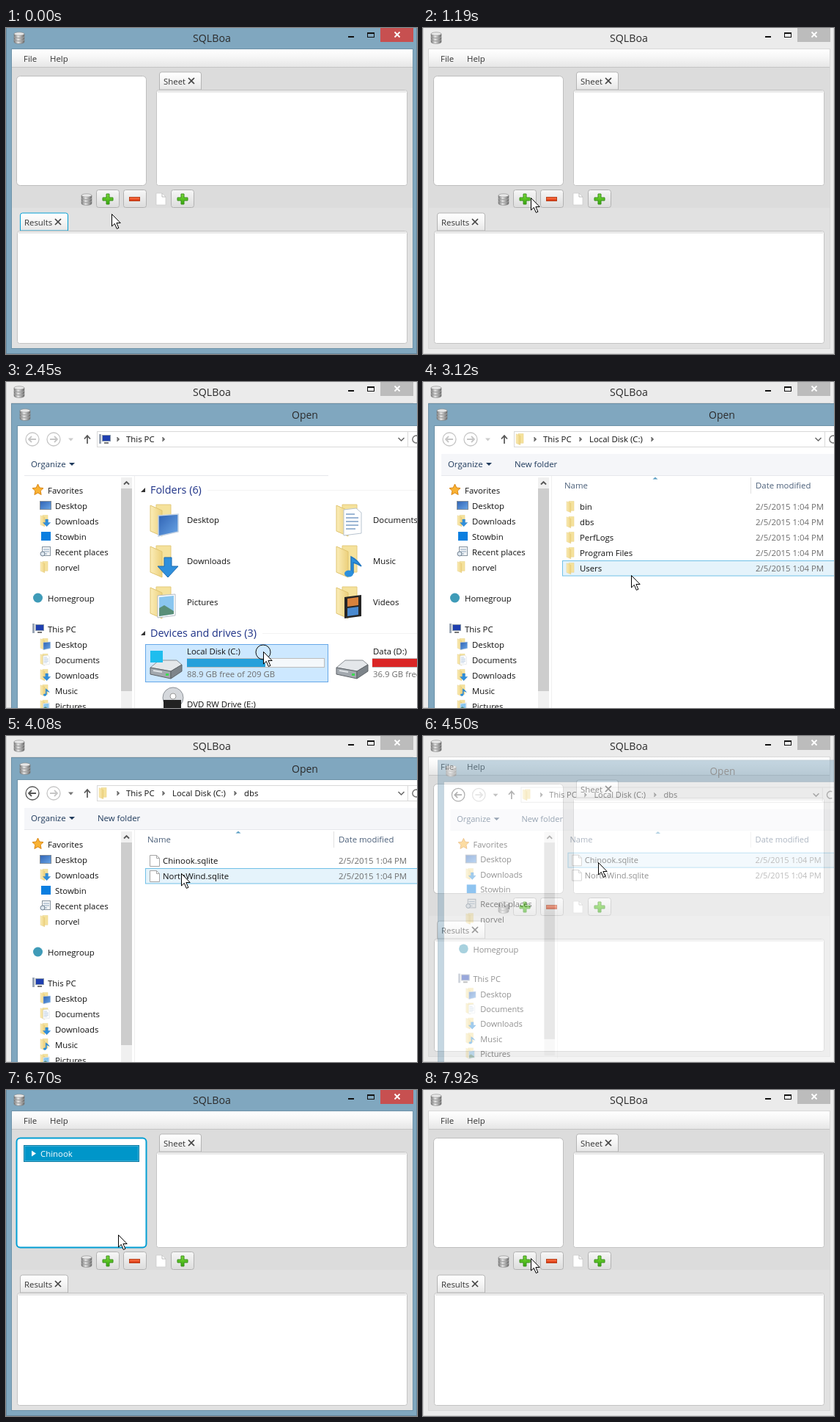
These frames come from a looping animation (561x444 px, 8 s). An HTML page:

```html
<!DOCTYPE html>
<html lang="en">
<head>
<meta charset="utf-8">
<title>SQLBoa</title>
<style>
html, body { margin: 0; width: 100%; height: 100%; overflow: hidden; background: #ebebeb; }
svg { display: block; width: 561px; height: 444px; font-family: "Open Sans", "Noto Sans", sans-serif; }
</style>
</head>
<body>
<svg viewBox="0 0 561 444">
  <defs>
    <linearGradient id="menu" x2="0" y2="1"><stop stop-color="#fff"/><stop offset=".45" stop-color="#f6f6f6"/><stop offset="1" stop-color="#e6e6e6"/></linearGradient>
    <linearGradient id="btn" x2="0" y2="1"><stop stop-color="#f7f7f7"/><stop offset="1" stop-color="#dcdcdc"/></linearGradient>
    <linearGradient id="metal"><stop stop-color="#777"/><stop offset=".4" stop-color="#eee"/><stop offset="1" stop-color="#666"/></linearGradient>
    <linearGradient id="green" x2="0" y2="1"><stop stop-color="#7ddb3c"/><stop offset="1" stop-color="#35a80c"/></linearGradient>
    <linearGradient id="red" x2="0" y2="1"><stop stop-color="#ff7a4a"/><stop offset="1" stop-color="#d6300c"/></linearGradient>
    <linearGradient id="flap"><stop stop-color="#fbedb8"/><stop offset="1" stop-color="#ecd07c"/></linearGradient>
    <linearGradient id="screen" x2="1" y2="1"><stop stop-color="#2f62b4"/><stop offset="1" stop-color="#6aa6e6"/></linearGradient>
  </defs>
  <g id="scene"></g>
</svg>
<script>
const scene = document.getElementById('scene');
const BLUE = '#80a7bf', FOCUS = '#039ed3', INK = '#111', GREY = '#6d6d6d';

// Drawing helpers, each returning markup
const text = (x, y, s, fill = INK, size = 11.4) =>
  `<text x="${x}" y="${y}" fill="${fill}" font-size="${size}">${s}</text>`;
const rect = (x, y, w, h, fill, stroke = 'none', rx = 0, sw = 1) =>
  `<rect x="${x}" y="${y}" width="${w}" height="${h}" fill="${fill}" stroke="${stroke}" rx="${rx}" stroke-width="${sw}"/>`;
const path = (d, fill = 'none', stroke = 'none', w = 1) =>
  `<path d="${d}" fill="${fill}" stroke="${stroke}" stroke-width="${w}"/>`;
const circle = (x, y, r, fill = 'none', stroke = 'none', w = 1) =>
  `<circle cx="${x}" cy="${y}" r="${r}" fill="${fill}" stroke="${stroke}" stroke-width="${w}"/>`;
const at = (x, y, body, k = 1) => `<g transform="translate(${x} ${y}) scale(${k})">${body}</g>`;
const cross = (x, y, r, color, w) =>
  path(`M${x - r} ${y - r}l${2 * r} ${2 * r}m0 ${-2 * r}l${-2 * r} ${2 * r}`, 'none', color, w);

// Icons
const database = (x, y) => at(x, y, [10, 6, 2].map(v =>
  path(`M0 ${v}v3a7 2.3 0 0 0 14 0v-3z`, 'url(#metal)', '#777', .6) +
  `<ellipse cx="7" cy="${v}" rx="7" ry="2.2" fill="#e8e8e8" stroke="#888" stroke-width=".6"/>`).join(''));
const page = (x, y) => path(`M${x} ${y}h9l4 4v11h-13z`, '#fff', '#a5a5a5') +
  path(`M${x + 9} ${y}v4h4`, 'none', '#a5a5a5');
const plus = (x, y) => path(`M${x - 2} ${y - 7}h4v5h5v4h-5v5h-4v-5h-5v-4h5z`, 'url(#green)', '#3b8f1c');
const monitor = (x, y) => rect(x + 4.5, y + 1.5, 11, 8, '#1f3fb0', '#8b98a8') +
  path(`M${x + 7} ${y + 12}h6`, 'none', '#777', 2) + rect(x, y, 3, 13, '#9aa5b5');
const overlays = {
  Desktop: path('M11 16l27-2v24l-27 6z', 'url(#screen)', '#c4d2e2', 1.5),
  Downloads: path('M19 17h10v12h9L24 44 10 29h9z', '#2f8fdc', '#1c6bb0'),
  Documents: path('M10 8l17-2 7 6v28l-24 3z', '#fff', '#b8c4d0') +
    path('M13 14h12m-12 5h17m-17 5h17m-17 5h17m-17 5h13', 'none', '#7c9fc6', 1.3),
  Music: path('M20 39V16q8 4 14 13-6-4-11-5v15', '#2b8fdd', '#2377c0', 1.5) +
    `<ellipse cx="17" cy="39" rx="6" ry="4.500" fill="#2b8fdd"/>`,
  Pictures: path('M10 13l24-2v29l-24 3z', '#fff', '#b4bcc5') + path('M12 15l20-2v25l-20 3z', '#8ac6ef') +
    path('M12 41V30l7-4 13 8v4z', '#5a8f78'),
  Videos: path('M11 15l23-3v29l-23 3z', '#262626') + path('M15 17l15-2v11l-15 2z', '#d9823c') +
    path('M15 30l15-2v11l-15 2z', '#4a8ad0'),
};
const folder = (x, y, kind, k = 1) => at(x, y,
  path('M8 1h20v36H8z', '#f5e29c', '#e3ca7c') + path('M0 2l16 7v35L0 37z', 'url(#flap)', '#e0c470') + (overlays[kind] || ''), k);
const drive = (x, y) => at(x, y,
  path('M2 27L14 17h24l7 6-15 9z', '#e4e7ea', '#8a8f94') + path('M2 27l28 5v10L2 36z', '#a2a8ae', '#5c6166') +
  path('M30 32l15-9v9L30 42z', '#7d848a', '#5d6267') + rect(23, 35, 4, 3, '#3ddb52') + path('M6 31l12 2', 'none', '#dfe3e6', 2));
const screenIcon = y => rect(46.500, y - 5.500, 15, 11, 'url(#screen)', '#7d8a99');
const smallFolder = (x, y, kind) => folder(x + 1, y - 8, kind, .36);

// Main window
function tab(x, y, w, label, focused) {
  return path(`M${x + .5} ${y + 24}v-21q0-3 3-3h${w - 6}q3 0 3 3v21z`, 'url(#menu)', focused ? FOCUS : '#b4b4b4') +
    text(x + 6, y + 17, label, '#333') + cross(x + w - 13, y + 12, 4, '#444', 1.7);
}
const pane = (x, y, w, h) => rect(x + .5, y + .5, w, h, '#fff', '#c4c4c4', 3) + rect(x + 2, y + 1, w - 3, 3, '#e9e9e9');
const button = (x, focused) =>
  rect(x + .5, 220.500, 31, 24, 'url(#btn)', focused ? FOCUS : '#b2b2b2', 3, focused ? 2 : 1);

function mainWindow({ active, focus, tree }) {
  const on = name => active && focus === name;
  const picked = tree === 2, ink = picked ? '#fff' : '#333';
  return rect(.5, -.5, 560, 444, active ? BLUE : '#ebebeb', active ? '#67899e' : '#d2d2d2') +
    database(11, 6) + text(255, 19, 'SQLBoa', '#2b2b2b', 14.200) +
    rect(467, 11, 8, 2, '#111') + rect(493.500, 6.500, 9, 6, 'none', '#111') + rect(493, 6, 10, 2, '#111') +
    rect(511, 0, 45, 19, active ? '#c75050' : '#bcbcbc') + cross(534, 9, 3.500, '#fff', 1.800) +
    rect(7.500, 28.500, 548, 408, '#dcdcdc', active ? '#6f93a9' : '#d8d8d8') +
    rect(8, 245, 547, 191, '#e1e1e1') + rect(8, 29, 547, 24, 'url(#menu)') + rect(8, 53, 547, 1, '#c4c4c4') +
    text(24, 46, 'File', '#333') + text(60, 46, 'Help', '#333') +
    rect(14.500, 65.500, 177, 149, '#fff', on('tree') ? FOCUS : '#bdbdbd', 5, on('tree') ? 2 : 1) +
    (picked ? rect(24.500, 75.500, 157, 22, '#0096c9', '#0b7ba3') + rect(25.500, 76.500, 155, 20, 'none', '#3fb0d8') : '') +
    (tree ? path('M35 82.500v8l6-4z', ink) + text(47, 91, 'Chinook', ink) : '') +
    tab(209, 60, 57, 'Sheet') + pane(205, 84, 342, 130) +
    database(103, 226) + button(123, on('add')) + plus(139, 233) +
    button(160, on('remove')) + rect(168.500, 230.500, 14, 5, 'url(#red)', '#b8401c') +
    path('M205 225h8l5 5v11h-13z', '#fff', '#c9c9c9', .7) + path('M213 225v5h5', 'none', '#bbb') + button(225) + plus(241, 233) +
    tab(19, 252, 65, 'Results', on('results')) + pane(15, 276, 532, 153);
}

// File dialog
const side = [
  [147, 'Favorites'], [168, 'Desktop'], [189, 'Downloads'], [210, 'Stowbin'], [231, 'Recent places'], [252, 'norvel'],
  [294, 'Homegroup'], [336, 'This PC'], [357, 'Desktop'], [378, 'Documents'], [399, 'Downloads'], [420, 'Music'], [441, 'Pictures'],
];
const sideIcons = {
  Favorites: y => path(`M43.500 ${y - 8}l2.300 5 5.200.6-3.900 3.700 1 5.200-4.600-2.600-4.600 2.600 1-5.200-3.900-3.700 5.200-.6z`, '#f9b233', '#d98512'),
  Homegroup: y => circle(43.500, y, 6.500, '#3f9bb8'),
  'This PC': y => monitor(36, y - 7),
  Stowbin: y => rect(48, y - 6, 13, 12, '#0a7ee0'),
  'Recent places': y => rect(49.500, y - 6.500, 11, 12, '#f2f4f6', '#8794a0') +
    path(`M51 ${y - 3}h8m-8 3h8m-8 3h5`, 'none', '#8ba4bc') + circle(50, y + 3, 3, '#dfe8f0', '#6f8090'),
};
const closed = (x, y) => path(`M${x + .5} ${y - 3.500}v7l4-3.500z`, '#fff', '#999');
const opened = (x, y) => path(`M${x + 6} ${y - 3}v6h-6z`, '#333');

function sidebar(hover) {
  let out = hover ? rect(18.500, 326.500, 138, 20, '#fff', '#e2e2e2') + rect(18.500, 221.500, 138, 20, '#e5f3fb', '#70c0e7') : '';
  for (const [y, name] of side) {
    const root = ['Favorites', 'Homegroup', 'This PC'].includes(name);
    const inPC = y > 336;
    const icon = sideIcons[name] ? sideIcons[name](y)
      : name === 'Desktop' && !inPC ? screenIcon(y) : smallFolder(46, y, name);
    out += icon + text(root ? 57 : 67, y + 5, name);
    if (hover && root) out += name === 'Homegroup' ? closed(28, y) : opened(25, y);
    if (hover && inPC) out += closed(39, y);
  }
  return out + rect(157, 130, 15, 314, '#f0f0f0') + rect(157, 145, 15, 276, '#cdcdcd') +
    path('M161 139.500l3.500-3.500 3.500 3.500', 'none', '#555', 1.800);
}

const heading = (y, label, end) => opened(184, y) + text(197, y + 5, label, '#1e3287', 14.400) + rect(end, y, 561 - end, 1, '#f3f3f3');

function computerView(c) {
  const hot = c.x > 190 && c.x < 440 && c.y > 357 && c.y < 409;
  let out = heading(147, 'Folders (6)', 275) + heading(342, 'Devices and drives (3)', 350);
  ['Desktop', 'Documents', 'Downloads', 'Music', 'Pictures', 'Videos'].forEach((name, i) => {
    const x = i % 2 * 254, y = 188 + (i >> 1) * 56;
    out += folder(197 + x, y - 22, name) + text(247 + x, y + 4, name);
  });
  return out + (hot ? rect(190.500, 357.500, 249, 51, '#cde8ff', '#66a7e8') : '') +
    drive(195, 362) + rect(197, 366, 17, 16, '#1fbdee') +
    text(247, 371, 'Local Disk (C:)') + rect(247.500, 376.500, 187, 12, hot ? '#f4f8fb' : '#e6e6e6', '#bcbcbc') +
    rect(247, 377, 107, 11, '#26a0da') + text(247, 402, '88.9 GB free of 209 GB', GREY) +
    drive(449, 362) + text(501, 371, 'Data (D:)') + rect(500.500, 376.500, 188, 12, '#e6e6e6', '#bcbcbc') +
    rect(500, 377, 172, 11, '#da2626') + text(501, 402, '36.9 GB free of 465 GB', GREY) +
    circle(228, 430, 14, '#d5d8dc', '#8d9298') + circle(228, 428, 4, '#fff', '#999') + rect(215, 433, 24, 13, '#222') +
    text(247, 443, 'DVD RW Drive (E:)');
}

function listView(names, c, isFolder) {
  const hot = Math.floor((c.y - 159.500) / 21);
  return text(193, 145, 'Name', '#4c607a') + text(454, 145, 'Date modified', '#4c607a') +
    rect(447, 130, 1, 22, '#e0e0e0') + path('M313.500 132.500l3.500-3 3.500 3z', '#5d9fc4') +
    names.map((name, i) => {
      const y = 170 + 21 * i;
      return (i === hot ? rect(190.500, y - 10.500, 380, 20.500, '#e5f3fb', '#70c0e7') : '') +
        (isFolder ? smallFolder(195, y) : page(196.500, y - 7.500)) +
        text(214, y + 4, name) + text(454, y + 4, '2/5/2015 1:04 PM', GREY);
    }).join('');
}

// dir is -1 for back, 1 for forward
const arrowButton = (x, dir, color) => circle(x, 78, 9, '#fff', color, 1.300) +
  path(`M${x - 5 * dir} 78h${10 * dir}m${-4 * dir} -4l${4 * dir} 4 ${-4 * dir} 4`, 'none', color, 1.800);

function dialog(view, c) {
  const crumbs = ['This PC', 'Local Disk (C:)', 'dbs'].slice(0, view + 1);
  const body = view === 0 ? computerView(c)
    : view === 1 ? listView(['bin', 'dbs', 'PerfLogs', 'Program Files', 'Users'], c, true)
    : listView(['Chinook.sqlite', 'NorthWind.sqlite'], c);
  return rect(7.500, 29.500, 620, 460, BLUE, '#6c8fa5') + database(19, 37) + text(390, 50, 'Open', '#2b2b2b', 14) +
    rect(15.500, 59.500, 620, 440, '#fff', '#6f93a9') +
    arrowButton(36, -1, view > 1 ? '#555' : '#c6c6c6') + arrowButton(65, 1, '#c6c6c6') +
    path('M85 76.500h7l-3.500 4z', view > 1 ? '#777' : '#ccc') +
    path('M111 84v-11m-4 4.500l4-4.500 4 4.500', 'none', '#555', 1.700) +
    rect(124.500, 67.500, 500, 21, '#fff', '#d9d9d9') + rect(548, 68, 1, 21, '#d9d9d9') +
    path('M535.500 76l4 4 4-4', 'none', '#666', 1.500) + path('M562 73.500a5 5 0 1 0 0 9', 'none', '#777', 1.500) +
    (view ? smallFolder(126, 78) : monitor(127, 71)) +
    [153, 215, 313].slice(0, view + 2).map(x => path(`M${x - 1.500} 75l3 3-3 3`, '#777', '#444')).join('') +
    crumbs.map((name, i) => text([164, 227, 325][i], 82, name)).join('') +
    (view ? rect(25, 98, 540, 29, '#f5f6f9') + text(125, 116, 'New folder', '#1e395b') : '') +
    rect(25, 127, view ? 540 : 415, 1, '#e6e8ec') + rect(175, 128, 1, 320, '#f0f0f0') +
    text(34, 116, 'Organize', '#1e395b') + path('M86 110h8l-4 4z', '#1e395b') +
    sidebar(view === 0 && c.x < 172) + body;
}

// Pointer: time, x, y
const track = [
  [0, 144, 253], [400, 144, 253], [700, 146, 235], [950, 146, 230], [1280, 147, 231], [1430, 150, 240], [1580, 150, 240],
  [1950, 240, 300], [2330, 345, 362], [2450, 351, 367], [2690, 351, 367], [3300, 250, 210], [3630, 239, 190], [3780, 239, 190],
  [4080, 239, 187], [4340, 239, 172], [4490, 239, 172], [4780, 239, 180], [4930, 245, 190], [5170, 257, 232], [5410, 215, 240],
  [5650, 165, 225], [5890, 136, 146], [6010, 120, 120], [6148, 75, 92], [6286, 70, 88], [6424, 70, 88], [6562, 110, 142],
  [6700, 153, 197], [6850, 172, 225], [7000, 175, 230], [7520, 172, 230], [7780, 147, 229], [8000, 147, 229],
];
const clicks = [[950, 1100], [2400, 2570], [3480, 3700], [4340, 4480], [6280, 6420], [7000, 7110], [7700, 7900]];

function pointerAt(t) {
  const i = track.findIndex(k => k[0] > t);
  const [t0, x0, y0] = track[i - 1], [t1, x1, y1] = track[i];
  const p = (t - t0) / (t1 - t0);
  return { x: Math.round(x0 + (x1 - x0) * p), y: Math.round(y0 + (y1 - y0) * p) };
}

const within = (t, a, b) => t >= a && t < b;

function pointer(t, c) {
  const overEditor = t > 4600 && c.x > 205 && c.y > 84 && c.y < 215;
  const shape = overEditor ? path('M-3-7.500h2.500l.5.500.5-.500h2.500M0-7v15M-3 8.500h2.500l.5-.500.5.500h2.500', 'none', '#111', 1.200)
    : path('M.5.5v16.500l3.800-3.600 3 7 2.600-1.100-3-6.800h5.300z', '#fff', '#000');
  const clicked = clicks.some(([a, b]) => within(t, a, b));
  return (clicked ? circle(c.x, c.y + 1, 10, 'none', '#111') : '') + at(c.x, c.y, shape);
}

function draw(t) {
  const c = pointerAt(t);
  const active = !within(t, 1100, 4600) && t < 7900;
  const focus = t < 950 ? 'results' : t < 6280 ? 'add' : t < 7000 ? 'tree' : t < 7700 ? 'remove' : 'add';
  const tree = within(t, 4600, 6280) ? 1 : within(t, 6280, 7110) ? 2 : 0;
  let out = mainWindow({ active, focus, tree });
  if (within(t, 1250, 4600)) {
    const view = t < 2800 ? 0 : t < 3780 ? 1 : 2;
    const [opacity, k] = t < 1400 || t > 4480 ? [.45, .97] : t < 1580 ? [.93, .9915] : [1, 1];
    out += `<g opacity="${opacity}" transform="translate(440 150) scale(${k}) translate(-440 -150)">${dialog(view, c)}</g>`;
  }
  scene.innerHTML = out + pointer(t, c);
}

const steps = [
  [0, 0, 1], [400, 1430, 8], [1580, 2450, 8], [2570, 2570, 1], [2690, 3630, 8], [3780, 4080, 3], [4200, 4780, 5],
  [4930, 5890, 9], [6010, 6700, 6], [6850, 7000, 2], [7120, 7120, 1], [7520, 7920, 4],
].flatMap(([a, b, n]) => Array.from({ length: n }, (_, i) => Math.round(a + (b - a) * i / Math.max(1, n - 1))));

let shown = -1;
const start = performance.now();
function tick() {
  const t = Math.max(0, performance.now() - start) % 8000;
  const step = steps.filter(s => s <= t).pop();
  if (step !== shown) draw(shown = step);
  requestAnimationFrame(tick);
}
tick();
</script>
</body>
</html>
```
